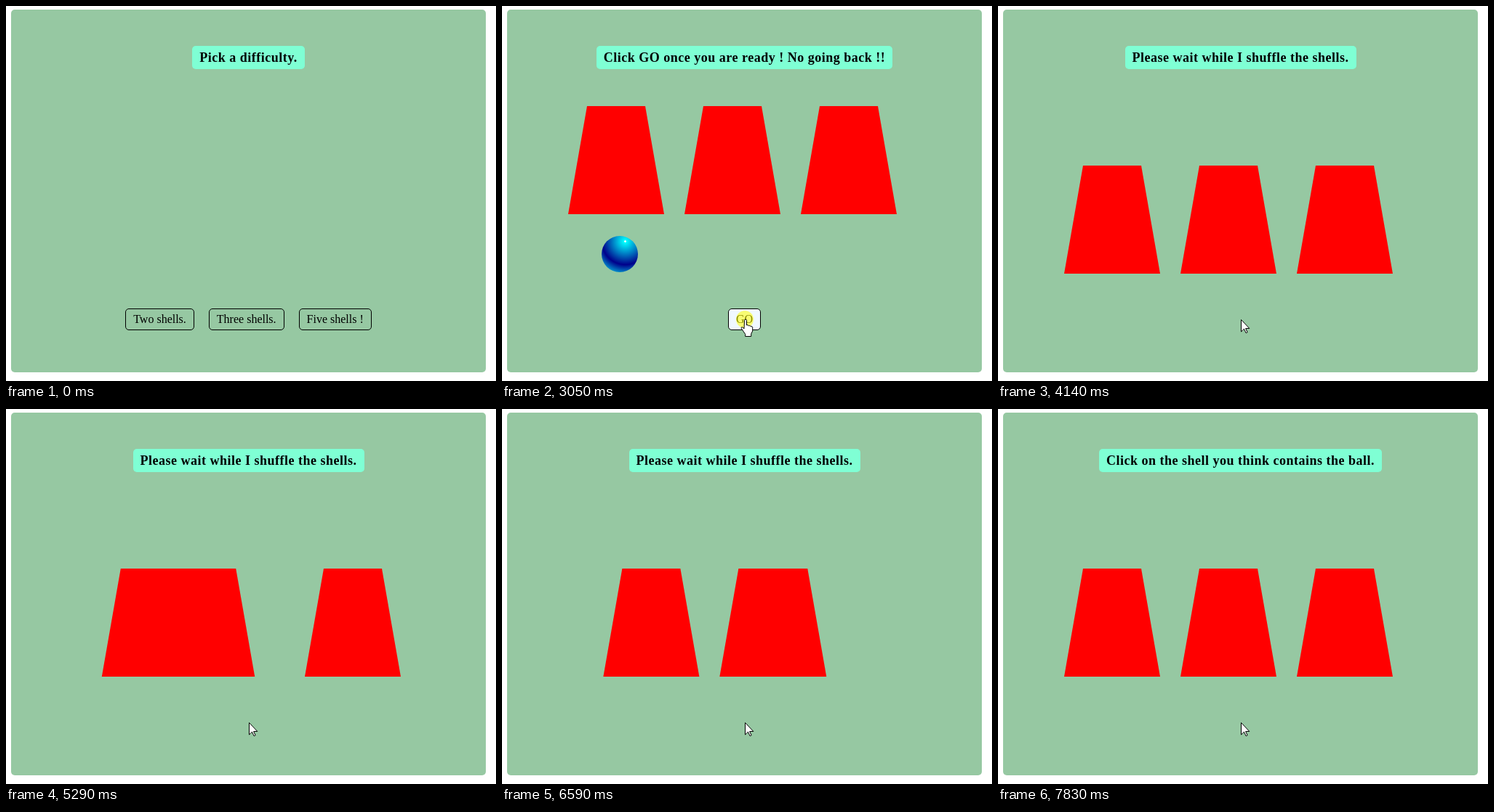
These frames come from a looping animation (674x517 px, 8000 ms). An HTML page:

```html
<!DOCTYPE html>
<html lang="en">
<head>
<meta charset="utf-8">
<title>Shell game</title>
<style>
  html, body { margin: 0; width: 100%; height: 100%; overflow: hidden; background: #fff; }
  body { position: relative; font: 16px "Liberation Serif", serif; color: #000; }
  body > * { position: absolute; }
  #table { left: 7px; top: 5px; width: 653px; height: 500px; border-radius: 5px; background: #96c8a2; }
  .row { left: 7px; width: 653px; display: flex; justify-content: center; gap: 20px; white-space: nowrap; }
  #top { top: 55px; }
  #title { padding: 0 10px; border-radius: 5px; background: #7fffd4; font-weight: bold; font-size: 18px; line-height: 32px; letter-spacing: .5px; }
  #buttons, #go { top: 417px; }
  .row span { padding: 0 10px; border: 1px solid #000; border-radius: 5px; line-height: 28px; }
  .row .hover { background: #f0f8ff; }
  #ball { left: 137px; top: 317px; width: 50px; height: 50px; border-radius: 50%;
    background: radial-gradient(circle at 65% 15%, white 1px, aqua 3%, darkblue 60%, aqua 100%); }
  svg { left: 0; top: 0; }
</style>
</head>
<body>
<div id="table"></div>
<div id="top" class="row"><div id="title"></div></div>
<div id="buttons" class="row"><span>Two shells.</span><span id="three">Three shells.</span><span>Five shells !</span></div>
<div id="go" class="row"><span class="hover">GO</span></div>
<div id="ball"></div>
<svg width="674" height="517">
  <g id="shells" fill="red">
    <path d="M26 0h80l26 149H0z"/><path d="M26 0h80l26 149H0z"/><path d="M26 0h80l26 149H0z"/>
  </g>
  <circle id="press" cx="334" cy="432" r="12" fill="#ff0" fill-opacity=".55"/>
  <g id="cursor" fill="#fff" stroke="#000" stroke-linejoin="round">
    <path id="arrow" d="M.5.5V17l4-3.8 2.6 5.6 2-1-2.5-5.3h5.2z"/>
    <path id="hand" d="M-.5 1.5q0-1.5 1.5-1.5t1.5 1.5V8q1.6-1 2.8.8 1.7-.8 2.8.9 2.4-.5 2.6 1.6V16l-2 4v3.5h-8v-3l-5.5-8q-.5-2 1.5-1.8l2.3 2.2z"/>
  </g>
</svg>
<script>
const $ = id => document.getElementById(id);
const LOOP = 8000, PICK = 1200, GO = 3120, DROP = 3145, ASK = 7830, SHUFFLE = 650;

// Start time and distance travelled by each shell
const moves = [
  [5000, [160, -160, 0]],
  [5760, [320, -160, -160]],
  [6459, [160, 160, -320]],
  [7168, [320, -160, -160]]
];

const progress = (t, start, length) => Math.min(1, Math.max(0, (t - start) / length));
const show = (id, visible) => $(id).style.display = visible ? "" : "none";

// The CSS "ease" curve, cubic-bezier(.25, .1, .25, 1)
function ease(x) {
  const bezier = (s, a, b) => 3 * (1 - s) ** 2 * s * a + 3 * (1 - s) * s * s * b + s ** 3;
  let low = 0, high = 1;
  for (let i = 0; i < 20; i++) {
    const mid = (low + high) / 2;
    if (bezier(mid, .25, .25) < x) low = mid; else high = mid;
  }
  return bezier(high, .1, 1);
}

function titleAt(t) {
  if (t < PICK) return "Pick a difficulty.";
  if (t < GO) return "Click GO once you are ready ! No going back !!";
  if (t < ASK) return "Please wait while I shuffle the shells.";
  return "Click on the shell you think contains the ball.";
}

function draw(t) {
  $("title").textContent = titleAt(t);
  show("buttons", t < PICK);
  show("go", t >= PICK && t < GO);
  show("ball", t >= PICK && t < DROP + 1000);
  show("shells", t >= PICK);
  show("press", (t >= 1070 && t < PICK) || (t >= 3050 && t < GO));

  const y = 138 + 82 * ease(progress(t, DROP, 1000));
  const move = moves.findLast(([start]) => t >= start);
  [...$("shells").children].forEach((shell, i) => {
    const dx = move ? move[1][i] * ease(progress(t, move[0], SHUFFLE)) : 0;
    shell.setAttribute("transform", `translate(${91 + 160 * i + dx} ${y})`);
  });

  const away = (1 - progress(t, 260, 410)) ** 1.6;
  const cx = 334 + 116 * away, cy = 432 + 49 * away;
  const hover = t < GO && cx < 383 && cy < 447;
  show("cursor", t >= 260);
  show("arrow", !hover);
  show("hand", hover);
  $("three").className = hover ? "hover" : "";
  $("cursor").setAttribute("transform", `translate(${Math.round(cx)} ${Math.round(cy)})`);
}

const began = performance.now();
function tick() {
  draw((performance.now() - began) % LOOP);
  requestAnimationFrame(tick);
}
tick();
</script>
</body>
</html>
```
